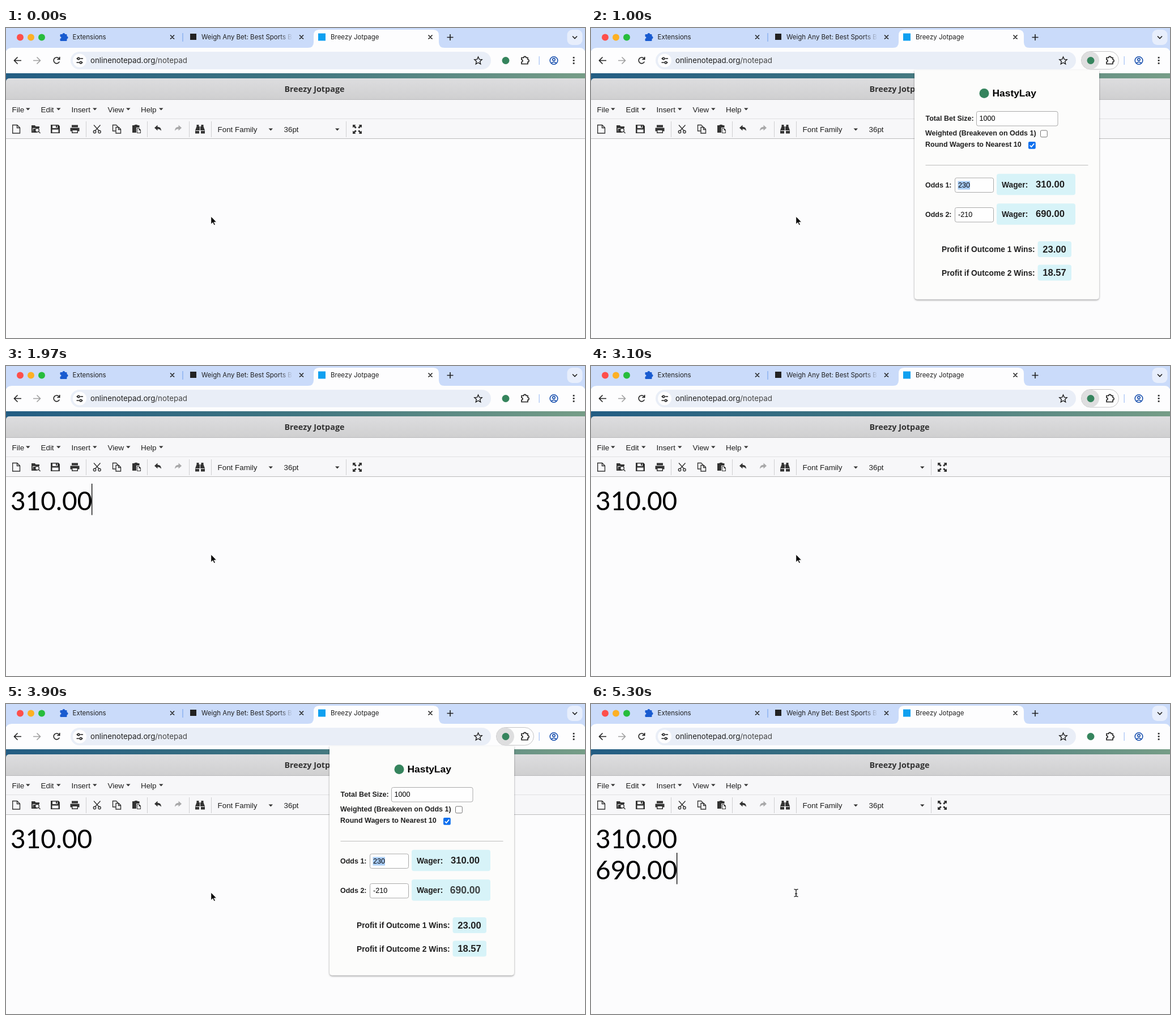
Animation of 1022x548 px, one loop 5.33 s. Source, as an HTML page:

```html
<!DOCTYPE html>
<html lang="en">
<head>
<meta charset="utf-8">
<title>Notepad demo</title>
<style>
html, body { margin: 0; width: 100%; height: 100%; overflow: hidden; background: #fcfcfd; }
svg { display: block; width: 100vw; height: 100vh; }
text { white-space: pre; fill: #1f1f1f; }
.tab { font: 11.5px Inter, sans-serif; }
.url { font: 13.3px Inter, sans-serif; }
.menu { font: 13.4px "Liberation Sans", Arial, sans-serif; }
.title { font: bold 14.4px "Open Sans", sans-serif; fill: #333; }
.note { font: 46px Lato, sans-serif; fill: #000; }
.lab { font: bold 12.5px "Liberation Sans", Arial, sans-serif; }
.field { font: 12.6px "Liberation Sans", Arial, sans-serif; fill: #000; }
.mid { font: bold 13.8px "Liberation Sans", Arial, sans-serif; }
.val { font: bold 16.6px "Liberation Sans", Arial, sans-serif; text-anchor: middle; }
.name { font: bold 17.4px "Liberation Sans", Arial, sans-serif; fill: #000; }
.line { fill: none; stroke: #1f1f1f; stroke-width: 1.6; }
.ico { fill: none; stroke: #333; stroke-width: 1.4; }
.solid { fill: #333; }
.input { fill: #fefefe; stroke: #aaa; }
.chip { fill: #d7f3f8; }
.pulse { transform-box: fill-box; transform-origin: center; }
</style>
</head>
<body>
<svg viewBox="0 0 1022 548">
<defs>
  <linearGradient id="strip"><stop stop-color="#235d83"/><stop offset=".5" stop-color="#3f7580"/><stop offset="1" stop-color="#769d87"/></linearGradient>
  <linearGradient id="bar" x2="0" y2="1"><stop stop-color="#dddddf"/><stop offset="1" stop-color="#cfcfd0"/></linearGradient>
  <linearGradient id="fade"><stop stop-color="#cadbfa" stop-opacity="0"/><stop offset="1" stop-color="#cadbfa"/></linearGradient>
  <clipPath id="tabClip"><path d="M340 0H505V35H340z"/></clipPath>
  <filter id="shadow" x="-10%" y="-10%" width="120%" height="120%"><feDropShadow dx="0" dy="1.5" stdDeviation="1.6" flood-opacity=".4"/></filter>
  <path id="puzzle" d="M-6-4H-2.2A2.1 2.1 0 0 1 2-4H5V-.7A2.1 2.1 0 0 1 5 3.5V7H-6V3.5A2 2 0 0 0-6-.5z"/>
</defs>

<!-- tab strip -->
<path fill="#cadbfa" d="M0 0H1022V40H0z"/>
<circle cx="25" cy="16.5" r="6" fill="#fe4f4b"/>
<circle cx="44" cy="16.5" r="6" fill="#fdb024"/>
<circle cx="63" cy="16.5" r="6" fill="#27bd3c"/>
<use href="#puzzle" x="102" y="15.5" fill="#195bd0" stroke="#195bd0"/>
<text class="tab" x="117.5" y="20">Extensions</text>
<path fill="#9bbcf3" d="M311 9h2v15h-2z"/>
<path fill="#222" d="M325 10h11v11h-11z"/>
<g clip-path="url(#tabClip)"><text class="tab" x="345" y="20">Weigh Any Bet: Best Sports B</text></g>
<path fill="url(#fade)" d="M482 6h24v20h-24z"/>
<path fill="#fdfdfe" d="M533 35Q543 35 543 25V13Q543 3 553 3H754Q764 3 764 13V25Q764 35 774 35z"/>
<path fill="#10a0f0" d="M551 9.500h13v13h-13z"/>
<text class="tab" x="573" y="20">Breezy Jotpage</text>
<path class="line" d="M290 12.500l7 7m0-7l-7 7M518 12.500l7 7m0-7l-7 7M745.500 12.500l7 7m0-7l-7 7M778.500 16.500h11m-5.500-5.500v11"/>
<rect x="990.500" y="3" width="27" height="27" rx="9" fill="#e7eefc"/>
<path class="line" d="M1000 14.500l4 4 4-4"/>

<!-- address bar -->
<path fill="#fdfdfe" d="M0 45Q0 35 10 35H1012Q1022 35 1022 45V80H0z"/>
<rect x="114" y="42" width="742" height="31" rx="15.500" fill="#e9eef7"/>
<circle cx="130" cy="57.500" r="12" fill="#fdfdfe"/>
<path class="line" d="M27 57.500H15m5.500-6l-6 6 6 6M94 54.500a5.300 5.300 0 1 0 .3 5M94.700 51v4.500h-4.500"/>
<path class="line" style="stroke:#a0a0a0" d="M48 57.500h12m-5.500-6l6 6-6 6"/>
<path class="line" d="M124.500 54h2m4.500 0h5M124.500 61h4.500m4.500 0h2"/>
<circle class="line" cx="128" cy="54" r="1.800"/><circle class="line" cx="132" cy="61" r="1.800"/>
<text class="url" x="149" y="62">onlinenotepad.org<tspan fill="#444">/notepad</tspan></text>
<path class="line" style="stroke-width:1.400" d="M833.500 51l1.900 4.400 4.800.4-3.600 3.200 1.100 4.700-4.200-2.500-4.200 2.500 1.100-4.700-3.600-3.200 4.800-.4z"/>
<g id="pill">
  <rect x="865.500" y="41.500" width="66" height="31.500" rx="15.700" fill="#fdfdfd" stroke="#c3c3c5"/>
  <circle cx="881.500" cy="57.300" r="15.500" fill="#dededf"/>
</g>
<circle cx="882" cy="57.500" r="6.500" fill="#35845d"/>
<use class="line" href="#puzzle" x="916" y="56.500"/>
<path fill="#b4cdf6" d="M940.500 50h1.500v15h-1.500z"/>
<g fill="none" stroke="#174fae" stroke-width="1.600">
  <circle cx="967" cy="57.500" r="6.800"/><circle cx="967" cy="55.800" r="2.200"/><path d="M962.500 62q4.500-3.500 9 0"/>
</g>
<path class="solid" d="M1000.700 51h2.800v2.800h-2.800zM1000.700 56h2.800v2.800h-2.800zM1000.700 61h2.800v2.800h-2.800z"/>

<!-- notepad window -->
<path fill="url(#strip)" d="M0 80H1022V96H0z"/>
<path fill="url(#bar)" d="M0 94Q1 89 6 89H1022V127H0z"/>
<path fill="#b8b8ba" d="M0 126h1022v1H0z"/>
<text class="title" x="544.500" y="113" text-anchor="middle">Breezy Jotpage</text>
<path fill="#f7f7f9" d="M0 127h1022v68H0z"/>
<path fill="#e1e1e3" d="M0 160h1022v1H0z"/>
<path fill="#bababc" d="M0 195h1022v1H0z"/>
<path fill="#fcfcfd" d="M0 196h1022v352H0z"/>
<g id="menus"></g>
<path stroke="#cfcfd1" d="M141.500 165v28M249.500 165v28M323.500 165v28M362.500 165v28M600.500 165v28"/>
<path class="ico" d="M11.700 171.500h8l4.800 4.800v9.700H11.700zM19.500 171.500v5h5"/>
<path class="solid" d="M45 172h6l1.500 2H59v3H47v8h-2zM48 178h4a5 5 0 0 0 4 7H47z"/>
<circle class="ico" cx="55" cy="180.500" r="3.300"/><path class="ico" stroke-width="2" d="M57.500 183l3 3"/>
<path class="solid" fill-rule="evenodd" d="M79 171h13.500l2.500 2.500V186H79zM82 172.500v4.500h9v-4.500zM81.500 179.500v5h11v-5zM88 172.500h2v3.500h-2z"/>
<path class="solid" fill-rule="evenodd" d="M116 171.500h11v4h-11zM113.500 176.500h16v6h-2.500v3.500h-11v-3.500h-2.500zM117.500 181v3.500h8V181z"/>
<path class="ico" stroke-width="2" d="M155 171.500l9 10M166.500 171.500l-9 10"/>
<circle class="ico" cx="156.500" cy="183.500" r="2.200"/><circle class="ico" cx="165" cy="183.500" r="2.200"/>
<path class="ico" d="M194 182h-5.500v-10.500h6l3 3v1.500M194 175.500h5l3.500 3.500v7H194zM198.500 175.500v4h4"/>
<path class="solid" fill-rule="evenodd" d="M223 172h3q3.500-2.500 7 0h2.500v4H230v9h-7zM231 177h4l3 3v6h-7zM232 178v7h5v-4h-2.500v-3z"/>
<path id="undo" class="solid" d="M262 176.500l5.500-5v3.200q6.500 0 6.500 7.300-2-3.700-6.500-3.600v3.200z"/>
<use href="#undo" transform="matrix(-1 0 0 1 572 0)" opacity=".4"/>
<path class="solid" d="M336.500 171h4v3h4v-3h4v3l2.500 7v5.500h-7V181h-3v5.500h-7V181l2.500-7z"/>
<path stroke="#f7f7f9" d="M342.500 174v7M334.500 181.500h6.500M344 181.500h6.500"/>
<path class="solid" d="M612 171h5.500l-1.700 1.700 3 3-2.100 2.100-3-3-1.700 1.700zM628 171h-5.500l1.700 1.700-3 3 2.100 2.100 3-3 1.700 1.700zM612 187h5.500l-1.700-1.700 3-3-2.100-2.100-3 3-1.700-1.700zM628 187h-5.500l1.700-1.700-3-3 2.100-2.100 3 3 1.700-1.700z"/>
<text class="menu" x="373.500" y="184" textLength="">Font Family</text>
<text class="menu" x="490.500" y="184">36pt</text>

<!-- note -->
<text class="note" id="first" x="8" y="255">310.00</text>
<text class="note" id="second" x="8" y="310">690.00</text>
<path id="caret" fill="#000" d="M0 208h1.300v55.500H0z"/>

<!-- extension popup -->
<g id="popup">
  <path filter="url(#shadow)" fill="#fcfcfb" d="M571 74.500H897V474q0 5.500-5.500 5.500H576.500q-5.500 0-5.500-5.500z"/>
  <circle cx="694" cy="115.500" r="8.500" fill="#35845d"/>
  <text class="name" x="708.500" y="121">HastyLay</text>
  <text class="lab" x="590.500" y="164">Total Bet Size:</text>
  <rect class="input" x="680.500" y="147.500" width="143.500" height="25.500" rx="3"/>
  <text class="field" x="685.500" y="164">1000</text>
  <text class="lab" x="590" y="190">Weighted (Breakeven on Odds 1)</text>
  <rect x="793.500" y="181" width="11.800" height="11.800" rx="2" fill="#fff" stroke="#747474"/>
  <text class="lab" x="590" y="210">Round Wagers to Nearest 10</text>
  <rect x="772" y="201" width="12.800" height="12.800" rx="2" fill="#0b6fee"/>
  <path fill="none" stroke="#fff" stroke-width="1.800" d="M774.700 207.500l2.600 2.700 4.800-5.800"/>
  <path fill="#bfbfbd" d="M590.500 242h287v1h-287z"/>
  <g id="rows"></g>
</g>

<path id="arrow" fill="#000" stroke="#fff" stroke-width="1.100" d="M361.700 332.500v14.800l3.300-3.100 2.200 4.800 2.400-1.100-2.100-4.600h4.600z"/>
<path id="beam" fill="none" stroke="#222" stroke-width="1.300" d="M358.500 327.500q3.500 0 3.500 2v9q0 2-3.500 2M365.500 327.500q-3.500 0-3.500 2M365.500 340.500q-3.500 0-3.500-2M360 335.500h4"/>
</svg>
<script>
const $ = id => document.getElementById(id);
const LOOP = 5330, PULSE = 400;

const triangle = (x, y) => `<path class="solid" d="M${x} ${y}h7.500l-3.750 4z"/>`;
const menus = [["File", 10.500, 35], ["Edit", 61.500, 89], ["Insert", 115.500, 153], ["View", 179.500, 212], ["Help", 238, 270]];
$("menus").innerHTML = menus.map(([label, x, tip]) =>
  `<text class="menu" x="${x}" y="148.500">${label}</text>` + triangle(tip, 141.500)).join("")
  + triangle(463.500, 177.500) + triangle(581, 177.500);

const oddsRow = (n, odds, wager, y) => `
  <text class="lab" x="590" y="${y + 5}">Odds ${n}:</text>
  <rect class="input" x="642.500" y="${y - 11.500}" width="68" height="25.500" rx="3"/>
  ${n === 1 ? `<rect id="mark" x="647.500" y="${y - 6}" width="21.500" height="15"/>` : ""}
  <text class="field" x="648" y="${y + 5}">${odds}</text>
  <g class="pulse box">
    <rect class="chip" x="716" y="${y - 18.700}" width="139" height="37.500" rx="4"/>
    <text class="mid" x="725" y="${y + 5}">Wager:</text>
    <text class="val pulse" id="wager${n}" x="810.500" y="${y + 5.300}">${wager}</text>
  </g>`;
const profitRow = (n, profit, y) => `
  <text class="mid" x="619" y="${y + 5}">Profit if Outcome ${n} Wins:</text>
  <g class="pulse box">
    <rect class="chip" x="788.500" y="${y - 14}" width="59.500" height="28" rx="4"/>
    <text class="val" x="818" y="${y + 5.500}">${profit}</text>
  </g>`;
$("rows").innerHTML = oddsRow(1, "230", "310.00", 276.500) + oddsRow(2, "-210", "690.00", 329)
  + profitRow(1, "23.00", 391) + profitRow(2, "18.57", 432.500);
const boxes = document.querySelectorAll(".box");

const within = (t, ...spans) => spans.some(([a, b]) => t >= a && t < b);
const show = (id, on) => $(id).style.display = on ? "" : "none";
// Rises from 0 to 1 and back over one pulse.
const bump = (t, start) => within(t, [start, start + PULSE]) ? (1 - Math.cos(2 * Math.PI * (t - start) / PULSE)) / 2 : 0;
const swell = (el, p) => {
  el.style.transform = `scale(${1 + .1 * p})`;
  el.style.opacity = 1 - .3 * p;
};

function draw(t) {
  show("pill", within(t, [480, 1590], [3020, 4610]));
  show("popup", within(t, [580, 1590], [3270, 4610]));
  show("first", t >= 1770);
  show("second", t >= 5030);
  const beam = within(t, [2440, 2990], [4640, LOOP]);
  show("beam", beam);
  show("arrow", !beam);

  show("caret", within(t, [60, 470], [1440, 2250], [2440, 2940], [4500, LOOP]));
  const x = within(t, [1770, 2440]) || t >= 5030 ? 151 : 8.500;
  $("caret").setAttribute("transform", `translate(${x} ${t >= 2440 ? 55 : 0})`);

  $("mark").setAttribute("fill", within(t, [1440, 1590], [4500, 4610]) ? "#d2d2d2" : "#a9cdf8");
  const opening = Math.max(bump(t, 581), bump(t, 3270));
  boxes.forEach(box => swell(box, opening));
  swell($("wager1"), Math.max(opening, bump(t, 1090)));
  swell($("wager2"), Math.max(opening, bump(t, 3790)));
}

function frame(now) {
  draw(now % LOOP);
  requestAnimationFrame(frame);
}
draw(0);
requestAnimationFrame(frame);
</script>
</body>
</html>
```
